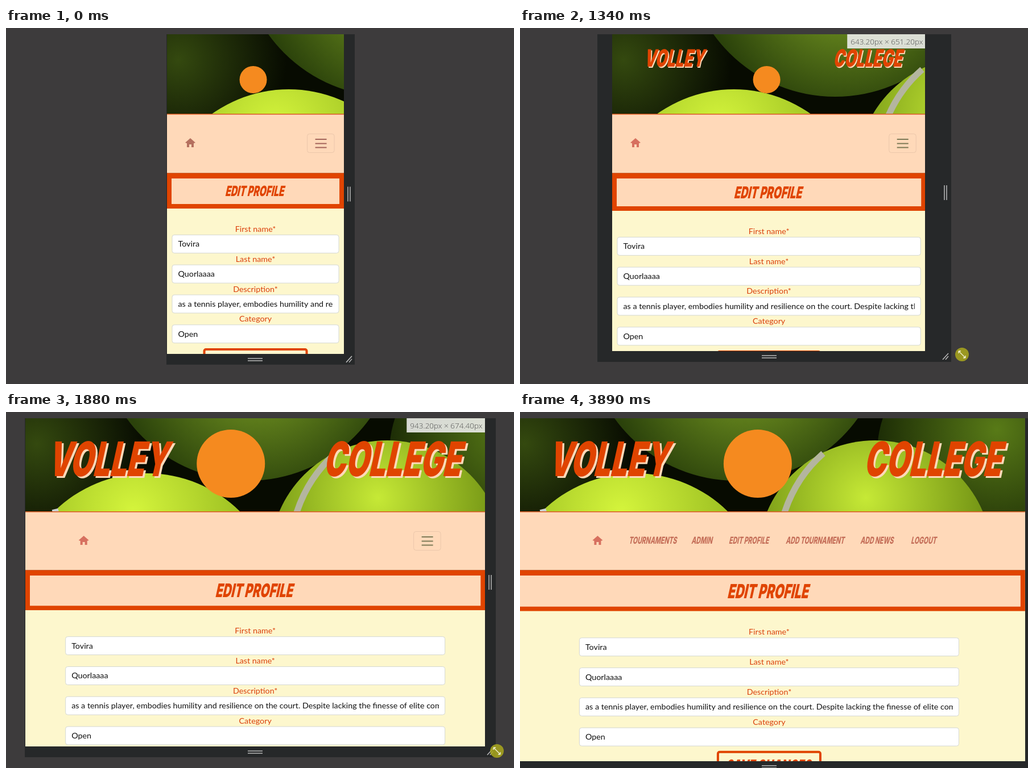
These frames come from a looping animation (893 px wide and 627 px high, 4550 ms). An HTML page with a canvas:

```html
<!DOCTYPE html>
<html lang="en">
<head>
<meta charset="utf-8">
<title>Responsive profile form</title>
<style>
html, body { margin: 0; width: 893px; height: 627px; overflow: hidden; background: #3d3b3c; }
canvas { display: block; }
</style>
</head>
<body>
<canvas id="stage" width="893" height="627"></canvas>
<script>
const ctx = document.getElementById('stage').getContext('2d');
const LOOP = 4550, TICK = 67, ZOOM = 0.857, TOP = 11;
const ORANGE = '#e04400', PEACH = '#ffd9b9', CREAM = '#fdf7cd', CHROME = '#262829';

// tick, frame left, paint left, paint right, css width, css height, cursor x, cursor y
const KEYS = [
  [1, 283, 283, 594, 363, 656.8, 705, 607],
  [7, 283, 283, 594, 363, 656.8, 606, 579],
  [13, 283, 283, 594, 363, 656.8, 606, 579],
  [19, 202, 202, 674, 550, 654, 756, 576],
  [20, 137, 162, 712, 643.2, 651.2, 777, 575],
  [25, 46, 46, 809, 906.4, 655.2, 842, 579],
  [27, 39, 39, 837, 931, 672, 857, 594],
  [28, 34, 34, 842, 943.2, 674.4, 863, 597],
  [32, -11, -11, 887, 1048, 691.2, 900, 609],
  [36, -11, -11, 887, 1048, 691.2, 900, 609],
  [43, -11, -11, 887, 1048, 698, 930, 620],
  [48, -11, -11, 887, 1048, 704.8, 930, 620],
  [51, -11, -11, 887, 1048, 704.8, 930, 620],
  [58, -12, -12, 888, 1050, 704.8, 930, 620]
];
const FIELDS = [
  ['First name*', 'Tovira'],
  ['Last name*', 'Quorlaaaa'],
  ['Description*', 'as a tennis player, embodies humility and resilience on the court. Despite lacking the finesse of elite competitors'],
  ['Category', 'Open']
];
const MENU = [['TOURNAMENTS', 191], ['ADMIN', 301], ['EDIT PROFILE', 367],
  ['ADD TOURNAMENT', 467], ['ADD NEWS', 598], ['LOGOUT', 687]];

function pose(tick) {
  const i = KEYS.findIndex(k => k[0] > tick);
  if (i === 0) return KEYS[0];
  if (i < 0) return KEYS[KEYS.length - 1];
  const a = KEYS[i - 1], b = KEYS[i], p = (tick - a[0]) / (b[0] - a[0]);
  return a.map((v, j) => v + (b[j] - v) * p);
}

function rect(x, y, w, h, color) {
  ctx.fillStyle = color;
  ctx.fillRect(x, y, w, h);
}

function rounded(x, y, w, h, r, fill, stroke, line = 1) {
  ctx.beginPath();
  ctx.roundRect(x, y, w, h, r);
  if (fill) { ctx.fillStyle = fill; ctx.fill(); }
  ctx.strokeStyle = stroke;
  ctx.lineWidth = line;
  ctx.stroke();
}

function disc(x, y, r, fill) {
  ctx.beginPath();
  ctx.arc(x, y, r, 0, 7);
  ctx.fillStyle = fill;
  ctx.fill();
}

function strokes(color, width, ...lines) {
  ctx.beginPath();
  for (const [x1, y1, x2, y2] of lines) {
    ctx.moveTo(x1, y1);
    ctx.lineTo(x2, y2);
  }
  ctx.strokeStyle = color;
  ctx.lineWidth = width;
  ctx.stroke();
}

function clipped(x, y, w, h, paint) {
  ctx.save();
  ctx.beginPath();
  ctx.rect(x, y, w, h);
  ctx.clip();
  paint();
  ctx.restore();
}

function glow(x, y, r, inner, outer) {
  const g = ctx.createRadialGradient(x, y, 0, x, y, r);
  g.addColorStop(0, inner);
  g.addColorStop(1, outer);
  return g;
}

// Slanted, condensed display face
function display(text, x, base, size, color, align = 'center', weight = 900) {
  ctx.save();
  ctx.translate(align === 'center' ? x - size * 0.08 : x, base);
  ctx.transform(0.62, 0, -0.22, 1, 0, 0);
  ctx.font = `${weight} ${size}px Inter, sans-serif`;
  ctx.textAlign = align;
  ctx.fillStyle = color;
  ctx.fillText(text, 0, 0);
  ctx.restore();
}

function plain(text, x, base, color, align = 'left', font = '14.3px Lato, sans-serif') {
  ctx.font = font;
  ctx.textAlign = align;
  ctx.fillStyle = color;
  ctx.fillText(text, x, base);
}

function title(text, x, base, size) {
  const drop = size / 26;
  display(text, x + drop, base + drop, size, PEACH);
  display(text, x, base, size, ORANGE);
}

function seam(color, x1, y1, cx, cy, x2, y2) {
  ctx.beginPath();
  ctx.moveTo(x1, y1);
  ctx.quadraticCurveTo(cx, cy, x2, y2);
  ctx.strokeStyle = color;
  ctx.lineWidth = 11;
  ctx.stroke();
}

function balls(x, w, h) {
  clipped(x, TOP, w, h, () => {
    ctx.translate(x, TOP);
    rect(0, 0, w, h, glow(20, 45, 190, '#34490f', '#070b01'));
    disc(830, 60, 190, glow(850, 20, 210, '#587a17', '#1d2d06'));
    disc(392, -153, 263, glow(410, -110, 250, '#84a927', '#2b420b'));
    disc(636, 245, 206, glow(620, 140, 220, '#c6e936', '#6f9013'));
    seam('#b4b59f', 545, 62, 456, 140, 462, 290);
    disc(214, 329, 232, glow(190, 165, 270, '#d5f53c', '#86aa18'));
    seam('#cbd0d0', 52, 160, 62, 200, 90, 290);
  });
}

function home(x, y, color) {
  ctx.fillStyle = color;
  ctx.beginPath();
  for (const [dx, dy] of [[0, -8], [9, 0], [6, 1], [6, 8], [2, 8], [2, 3], [-2, 3], [-2, 8], [-6, 8], [-6, 1], [-9, 0]])
    ctx.lineTo(x + dx, y + dy);
  ctx.fill();
}

function site(left, w) {
  const mid = left + w / 2, small = w < 494, wide = w > 658, full = w > 850;
  const wrapped = wide && w < 805, grow = w - 808;
  const navY = TOP + (wrapped ? 286 : wide ? 164 : 140);

  balls(left, w, navY - TOP);
  const [firstX, secondX, logoX] = wrapped ? [-170, 12, 174]
    : wide ? [-254 - grow * 0.255, 246 + grow * 0.51, -43 + grow * 0.25] : [-164, 176, -4];
  disc(mid + logoX, 91, wide ? 60 : 24, '#f58a1f');
  if (!small) {
    const size = wide ? 84 : 42, base = wide ? 113 : 68;
    title('VOLLEY', mid + firstX, base, size);
    title('COLLEGE', mid + secondX, wrapped ? 259 : base, size);
  }

  const headY = navY + (wide ? 104 : 105);
  rect(left, navY, w, headY - navY, PEACH);
  rect(left, navY, w, 1.5, '#d9581f');
  rect(left, headY - 1, w, 1, '#c9683a');
  home(wide ? mid - 301.5 : left + 41, navY + 51, small ? '#b5705f' : '#d7705f');
  if (full) {
    for (const [text, x] of MENU) display(text, x, navY + 57, 17, '#c56f59', 'left', 800);
  } else {
    const x = (wide ? mid + 326 : left + w - 17) - 47.5, y = navY + 35.5;
    rounded(x, y, 47.5, 33, 4, null, '#ebc7ab');
    strokes(small ? '#a3655a' : '#7d7a56', 2, ...[9.5, 17, 24].map(dy => [x + 14, y + dy, x + 34, y + dy]));
  }

  const headH = 62 + (w - 311) * 0.0166, size = 25 + (w - 311) * 0.016;
  rect(left, headY, w, headH, ORANGE);
  rect(left + 8, headY + 9, w - 16, headH - 17, PEACH);
  display('EDIT PROFILE', mid, headY + headH / 2 + size * 0.37, size, ORANGE);

  const formY = headY + headH, fieldW = Math.min(w - 17, 668), x = mid - fieldW / 2;
  rect(left, formY, w, 400, CREAM);
  FIELDS.forEach(([label, value], i) => {
    const y = formY + (full ? 47 : 46.4) + i * 52.8;
    plain(label, mid, y - 5.5, '#db400c', 'center');
    rounded(x + 0.5, y, fieldW - 1, 32, 4, '#fff', '#d5d8d2');
    clipped(x + 9, y, fieldW - 20, 32, () => plain(value, x + 11, y + 21, '#111'));
  });
  const buttonY = formY + 246;
  rounded(mid - 90, buttonY + 2, 180, 50, 3, CREAM, ORANGE, 4);
  display('SAVE CHANGES', mid, buttonY + 37, 30, ORANGE);
}

const cssSize = v => (Math.round(v / 0.8) * 0.8).toFixed(2) + 'px';

function chrome(left, right, bottom, hover) {
  rect(left - 1, TOP, right - left + 20, bottom - TOP + 19, hover ? '#505050' : CHROME);
  const y = (TOP + bottom) / 2;
  strokes('#b9b9b9', 1.5,
    [right + 7, y - 13, right + 7, y + 13], [right + 11, y - 13, right + 11, y + 13],
    [425, bottom + 8, 451, bottom + 8], [425, bottom + 12, 451, bottom + 12],
    [right + 4, bottom + 15, right + 14, bottom + 4], [right + 9, bottom + 15, right + 14, bottom + 9]);
}

function cursor(x, y, resizing) {
  disc(x, y, 12, 'rgba(170,168,28,.85)');
  if (resizing) {
    strokes('#f4f4d8', 1.3, [x - 6, y - 6, x + 6, y + 6],
      [x - 6, y - 6, x - 2, y - 6], [x - 6, y - 6, x - 6, y - 2],
      [x + 6, y + 6, x + 2, y + 6], [x + 6, y + 6, x + 6, y + 2]);
  } else {
    ctx.fillStyle = '#fff';
    ctx.beginPath();
    for (const [dx, dy] of [[0, 0], [0, 12], [3, 9], [8, 8]]) ctx.lineTo(x + dx, y + dy);
    ctx.fill();
  }
}

function draw(time) {
  const tick = Math.floor((time % LOOP + 10) / TICK);
  const [, frameX, left, paintRight, cssW, cssH, cx, cy] = pose(tick);
  const right = 877 - frameX - (frameX < 200 ? 1 : 0);
  const w = cssW * ZOOM, bottom = TOP + cssH * ZOOM;

  rect(0, 0, 893, 627, '#3d3b3c');
  chrome(frameX, right, bottom, tick >= 6 && tick < 13);
  if (cssW > 768) rect(frameX, TOP, right - frameX, bottom - TOP, CREAM);
  clipped(left, TOP, paintRight - left, bottom - TOP, () => {
    site(left, w);
    if (tick > 13 && tick < 36) {
      const x = left + w - 138;
      rect(x, TOP, 160, 25, 'rgba(240,240,240,.88)');
      plain(`${cssSize(cssW)} × ${cssSize(cssH)}`, x + 6, 29, '#505050', 'left', '300 13.5px "Open Sans", sans-serif');
    }
  });
  if (tick > 0) cursor(cx, cy, tick >= 6);
}

const start = performance.now();
function frame() {
  draw(performance.now() - start);
  requestAnimationFrame(frame);
}
frame();
</script>
</body>
</html>
```
